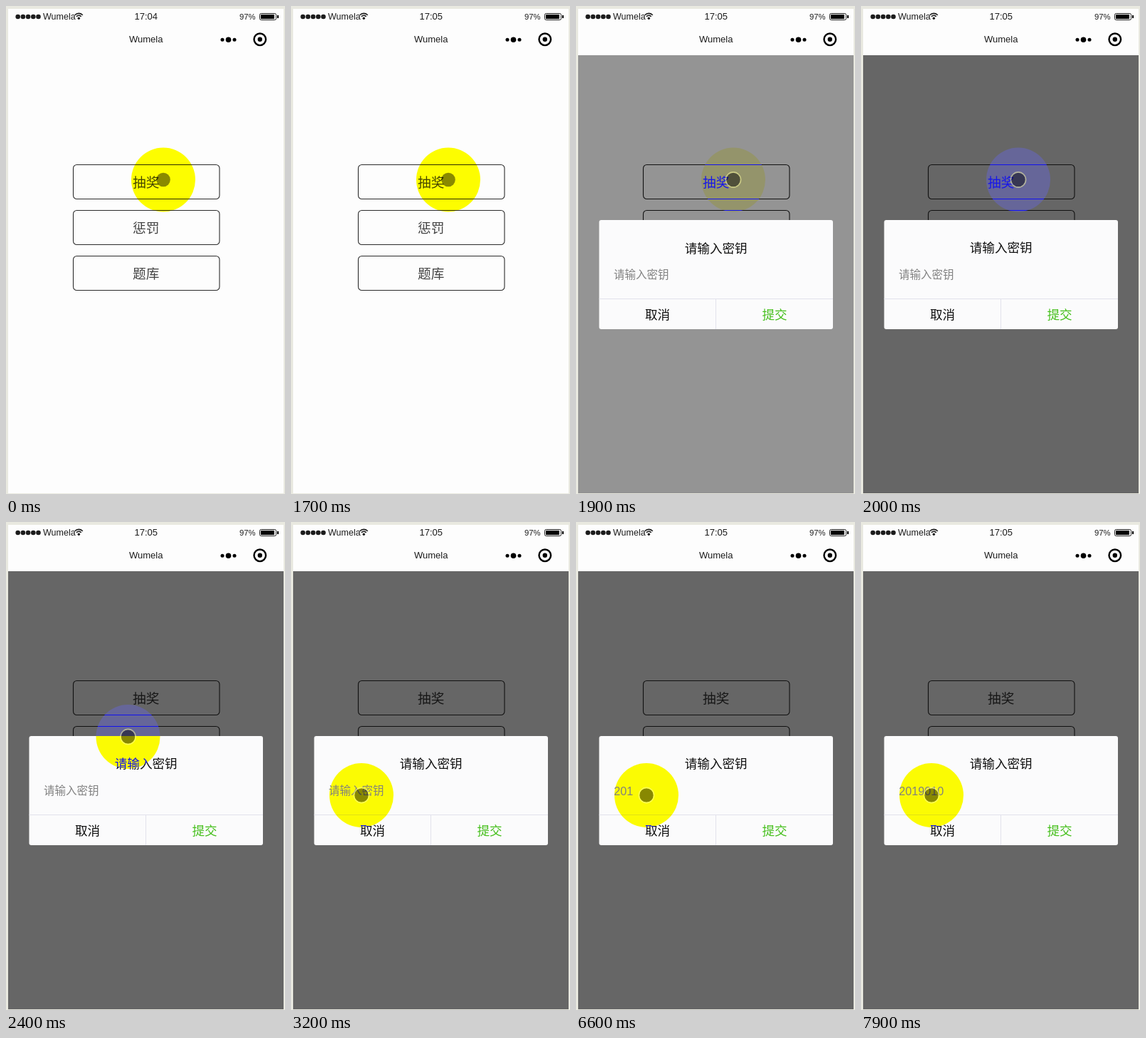
Write an HTML page with a canvas that moves like this. It is 392 px wide and 684 px high and loops after 8000 ms.

```html
<!DOCTYPE html>
<html lang="zh-CN">
<head>
<meta charset="utf-8">
<style>
html, body { margin: 0; width: 100%; height: 100%; overflow: hidden; }
canvas { display: block; width: 392px; height: 684px; }
</style>
</head>
<body>
<canvas id="stage"></canvas>
<script>
const W = 392, H = 684, LOOP = 8000, STEP = 100;
const LATIN = '"Liberation Sans", Arial, sans-serif';
const CJK = '"Noto Sans CJK SC", "Noto Sans CJK", sans-serif';
const APP_NAME = 'Wumela';
const INK = '#1c1c1c';
const DIALOG = { x: 32.5, y: 300, w: 328.5, h: 153 };
const FADE_START = 1700, FADE_TIME = 285;

const canvas = document.getElementById('stage');
const ctx = canvas.getContext('2d');
const ratio = window.devicePixelRatio || 1;
canvas.width = W * ratio;
canvas.height = H * ratio;

// Pointer path: time, x, y
const path = [
  [2200, 221, 243.5], [2300, 216, 257], [2400, 171.5, 301],
  [2500, 132, 346], [2600, 110, 377], [2800, 94, 396], [3200, 99, 383]
];
const keyTimes = [5300, 5700, 6500, 6900, 7200, 7500, 7800];
const KEY = '2019010';

function pointerAt(t) {
  if (t <= path[0][0]) return path[0].slice(1);
  for (let i = 1; i < path.length; i++) {
    const [t0, x0, y0] = path[i - 1], [t1, x1, y1] = path[i];
    if (t <= t1) {
      const k = (t - t0) / (t1 - t0);
      return [x0 + (x1 - x0) * k, y0 + (y1 - y0) * k];
    }
  }
  return path[path.length - 1].slice(1);
}

// y is the middle of the glyphs
function text(str, x, y, size, color, family = CJK, align = 'center') {
  ctx.font = `${size}px ${family}`;
  ctx.textAlign = align;
  ctx.fillStyle = color;
  ctx.fillText(str, x, y + size * 0.365);
}

function rect(x, y, w, h, color) {
  ctx.fillStyle = color;
  ctx.fillRect(x, y, w, h);
}

function roundRect(x, y, w, h, r) {
  ctx.beginPath();
  ctx.roundRect(x, y, w, h, r);
}

function circle(x, y, r) {
  ctx.beginPath();
  ctx.arc(x, y, r, 0, Math.PI * 2);
}

function dot(x, y, r, color) {
  circle(x, y, r);
  ctx.fillStyle = color;
  ctx.fill();
}

function drawHeader(t) {
  for (let i = 0; i < 5; i++) dot(16.7 + i * 7.2, 15, 3.3, INK);
  text(APP_NAME, 52, 14, 12.5, INK, LATIN, 'left');
  text(t < 1300 ? '17:04' : '17:05', 196.7, 13.8, 13, INK, LATIN);
  text('97%', 328, 14.5, 11.3, INK, LATIN, 'left');
  text(APP_NAME, 196.7, 46.3, 13, INK, LATIN);

  ctx.strokeStyle = INK;
  ctx.lineWidth = 1.6;
  for (const r of [4.6, 7.6]) {
    ctx.beginPath();
    ctx.arc(102.3, 18, r, Math.PI * 1.24, Math.PI * 1.76);
    ctx.stroke();
  }
  dot(102.3, 17.3, 1.7, INK);

  ctx.lineWidth = 1;
  roundRect(356.5, 10.5, 23, 9, 2);
  ctx.stroke();
  rect(358, 12, 19, 6, '#000');
  rect(381, 13, 2, 4, '#000');

  dot(304, 47.3, 2.5, '#000');
  dot(312.5, 47.3, 3.8, '#000');
  dot(321, 47.3, 2.5, '#000');
  dot(356.8, 46.8, 3.2, '#000');
  circle(356.8, 46.8, 8.3);
  ctx.lineWidth = 2.4;
  ctx.strokeStyle = '#000';
  ctx.stroke();
}

function drawButtons(lineColor, textColor) {
  ctx.strokeStyle = lineColor;
  ctx.lineWidth = 1.1;
  ['抽奖', '惩罚', '题库'].forEach((label, i) => {
    const y = 222.5 + i * 64;
    roundRect(94.5, y, 205.5, 48, 5);
    ctx.stroke();
    text(label, 196.7, y + 24.5, 18.7, textColor);
  });
}

function drawDialog(t) {
  const { x, y, w, h } = DIALOG;
  roundRect(x, y, w, h, 3);
  ctx.fillStyle = '#fbfbfc';
  ctx.fill();
  rect(x, 410, w, 1, '#e2e2ec');
  rect(196, 410, 1, 43, '#e2e2ec');
  text('请输入密钥', 196.7, t < 2000 ? 340 : 339, 17.6, '#111');
  text('取消', 114.5, 432.5, 17.6, '#111');
  text('提交', 279, 432.5, 17.6, '#45bf1c');

  const typed = KEY.slice(0, keyTimes.filter(k => t >= k).length);
  if (typed) text(typed, 53.3, 377, 16.2, '#828282', LATIN, 'left');
  else text('请输入密钥', 53, 376, 15.5, '#828282', CJK, 'left');
}

// On the dimmed page the highlight inverts the blue channel
function drawHalo(x, y, dimmed) {
  ctx.globalCompositeOperation = dimmed ? 'difference' : 'multiply';
  dot(x, y, 45, dimmed ? '#00f' : '#ff0');
  ctx.globalCompositeOperation = 'source-over';
}

function drawPointer(x, y, dimmed) {
  dot(x, y, 9.8, 'rgba(0,0,0,.46)');
  if (!dimmed) return;
  circle(x, y, 10.6);
  ctx.strokeStyle = 'rgba(255,255,160,.5)';
  ctx.lineWidth = 1.6;
  ctx.stroke();
}

function draw(t) {
  const fade = Math.min(1, Math.max(0, (t - FADE_START) / FADE_TIME));
  const dimmed = fade > 0;
  const [px, py] = pointerAt(t);
  ctx.setTransform(ratio, 0, 0, ratio, 0, 0);
  rect(0, 0, W, H, '#e9e9e0');
  rect(3, 4, 387, 679, '#fdfdfd');
  drawHeader(t);

  if (dimmed) {
    const gray = 255 - 153 * fade;
    rect(3, 69, 387, 614, `rgb(${gray},${gray},${gray})`);
    drawButtons('#111', '#161616');
    ctx.globalAlpha = Math.min(1, fade * 1.5);
    drawDialog(t);
    ctx.globalAlpha = 1;
  } else {
    drawButtons('#2c2c2c', '#444');
  }
  drawHalo(px, py, dimmed);
  drawPointer(px, py, dimmed);
}

const start = performance.now();
function tick() {
  const t = (performance.now() - start) % LOOP;
  draw(Math.floor(t / STEP) * STEP);
  requestAnimationFrame(tick);
}
tick();
</script>
</body>
</html>
```
